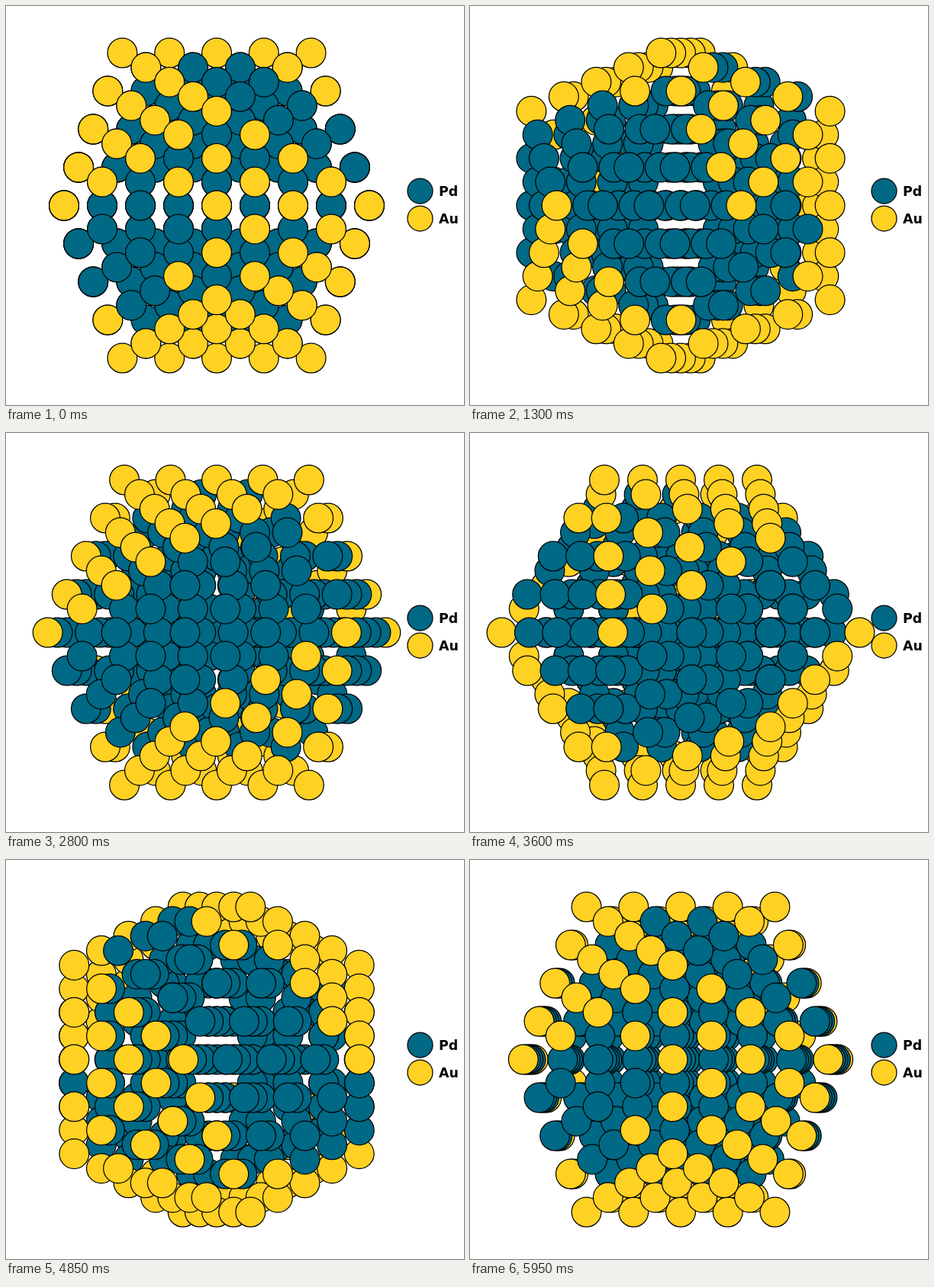
Write an HTML page that moves like this. It is 600 by 523 pixels and loops after 6 s.

```html
<!DOCTYPE html>
<html lang="en">
<head>
<meta charset="utf-8">
<title>Rotating Pd-Au cluster</title>
<style>
  html, body { margin: 0; width: 100%; height: 100%; overflow: hidden; background: #fff; }
  svg { display: block; width: 600px; height: 523px; }
  circle { stroke: #000; stroke-width: 1.25px; }
  text { font: bold 17.4px "DejaVu Sans", sans-serif; }
</style>
</head>
<body>
<svg viewBox="0 0 600 523">
  <g id="cluster"></g>
  <circle cx="542.5" cy="242.5" r="16.5" fill="#006985"/>
  <circle cx="542.5" cy="278.5" r="16.5" fill="#ffd123"/>
  <text x="567" y="249">Pd</text>
  <text x="567" y="285">Au</text>
</svg>
<script>
const PD = '#006985', AU = '#ffd123';
const CENTER = { x: 276, y: 261.5 }, UNIT = 30.9, RADIUS = 19.4;
const SHELLS = 4, STEP_MS = 50, STEPS = 120;
const PHI = (1 + Math.sqrt(5)) / 2;

// Icosahedron corners: top, bottom, front, back (K), right, left
const corners = {
  T: [1, PHI, 0], t: [-1, PHI, 0], B: [1, -PHI, 0], b: [-1, -PHI, 0],
  F: [0, 1, PHI], f: [0, -1, PHI], K: [0, 1, -PHI], k: [0, -1, -PHI],
  R: [PHI, 0, 1], r: [PHI, 0, -1], L: [-PHI, 0, 1], l: [-PHI, 0, -1]
};
const faces = ('TtF TtK Bbf Bbk TFR tFL TKr tKl FfR FfL ' +
  'Kkr Kkl RrT RrB Llt Llb BfR bfL Bkr bkl').split(' ');

// Outer edges and faces holding Pd, grouped by the largest weight
// their first corner may have; every other outer site is Au
const pdRegions = {
  3: 'Kk kr Kl Rr Ll',
  2: 'TF fL TR tl Br bL TtF TFR bfL Llt Llb tKl Kkl Kkr Bkr RrT RrB',
  1: 'FfL'
};
const pdCaps = Object.entries(pdRegions).flatMap(([cap, names]) =>
  names.split(' ').map(name => ({ name, cap: +cap })));

function isOuterPd(weights) {
  const used = Object.keys(weights).filter(c => weights[c] > 0);
  return pdCaps.some(({ name, cap }) =>
    name.length === used.length && used.every(c => name.includes(c)) &&
    weights[name[0]] <= cap);
}

function buildAtoms() {
  const atoms = new Map([['center', { pos: [0, 0, 0], color: PD }]]);
  for (let n = 1; n <= SHELLS; n++) {
    for (const [a, b, c] of faces) {
      for (let i = 0; i <= n; i++) {
        for (let j = 0; j <= n - i; j++) {
          const k = n - i - j;
          const pos = [0, 1, 2].map(d =>
            UNIT * (i * corners[a][d] + j * corners[b][d] + k * corners[c][d]));
          const pd = n < SHELLS || isOuterPd({ [a]: i, [b]: j, [c]: k });
          atoms.set(pos.map(v => Math.round(v * 100)).join(), { pos, color: pd ? PD : AU });
        }
      }
    }
  }
  return [...atoms.values()];
}

const atoms = buildAtoms();
const cluster = document.getElementById('cluster');
const circles = atoms.map(() => {
  const circle = document.createElementNS('http://www.w3.org/2000/svg', 'circle');
  circle.setAttribute('r', RADIUS);
  return cluster.appendChild(circle);
});

function draw(step) {
  const angle = step / STEPS * 2 * Math.PI;
  const cos = Math.cos(angle), sin = Math.sin(angle);
  atoms
    .map(({ pos: [x, y, z], color }) => ({
      x: CENTER.x + x * cos + z * sin,
      y: CENTER.y - y,
      depth: z * cos - x * sin,
      color
    }))
    .sort((p, q) => p.depth - q.depth)
    .forEach((p, i) => {
      circles[i].setAttribute('cx', p.x.toFixed(2));
      circles[i].setAttribute('cy', p.y.toFixed(2));
      circles[i].setAttribute('fill', p.color);
    });
}

let shown = -1;
function tick() {
  const step = Math.floor(performance.now() / STEP_MS) % STEPS;
  if (step !== shown) draw(shown = step);
  requestAnimationFrame(tick);
}
tick();
</script>
</body>
</html>
```
